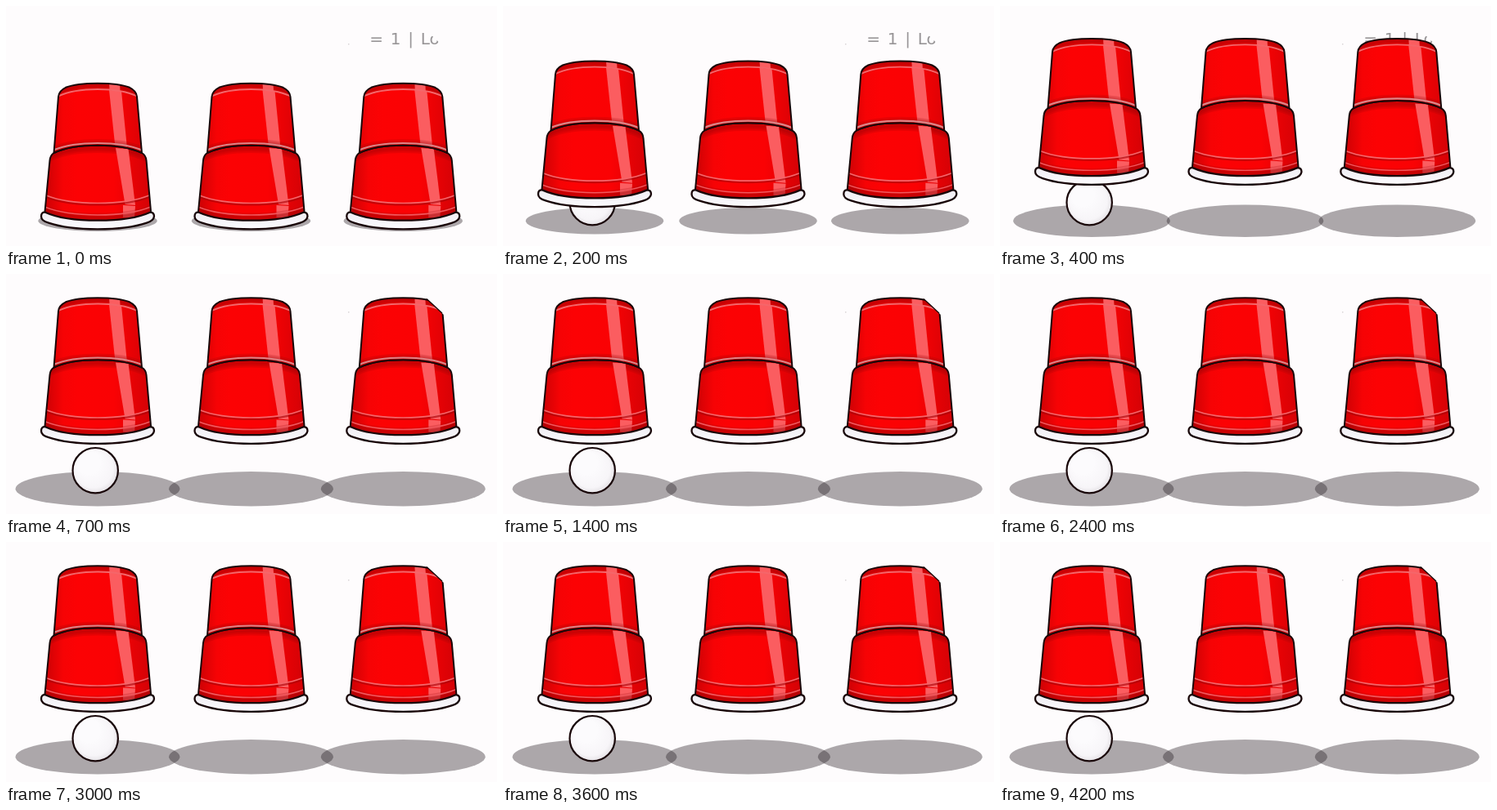
Animation of 600 by 294 pixels, one loop 4300 ms. Source, as an HTML page with a canvas:

```html
<!DOCTYPE html>
<html lang="en">
<head>
<meta charset="utf-8">
<title>Three cups</title>
<style>
html, body { margin: 0; width: 100%; height: 100%; overflow: hidden; background: #fefcfd; }
canvas { display: block; }
</style>
</head>
<body>
<canvas id="stage" width="600" height="294"></canvas>
<script>
const ctx = document.getElementById('stage').getContext('2d');
const LOOP = 4300, STEP = 100, LIFT_TIME = 480, LIFT = 65.5;
const PAPER = '#fefcfd', INK = '#190709';
const CUPS = [112, 299.5, 485.3];

// Cup outlines, relative to the cup's middle, standing on the table
const upper = new Path2D(`M-53.5 180 L-48 111 Q-47.5 104 -39 99.8
  C-22 93 22 93 39 99.8 Q47.5 104 48 111 L54 180 C28 167.5 -28 167.5 -53.5 180Z`);
const lower = new Path2D(`M-53.5 180 C-28 167.5 28 167.5 54 180 Q59 183 59.5 189
  L65.5 257 C35 269 -35 269 -65 257 L-58.5 189 Q-58 183 -53.5 180Z`);
const lip = new Path2D(`M-64 252.7 C-35 266 35 266 64 252.7 Q69 252.7 69 257.7
  Q68.5 263 60 265.7 C30 276 -30 276 -60 265.7 Q-69 263 -69 257.7 Q-69 252.2 -64 252.7Z`);

const red = ctx.createLinearGradient(-62, 0, 62, 0);
red.addColorStop(0, '#d00205');
red.addColorStop(0.16, '#f60305');
red.addColorStop(0.3, '#fc0204');
red.addColorStop(0.66, '#fa0204');
red.addColorStop(1, '#d60206');

const white = ctx.createLinearGradient(0, 253, 0, 275);
white.addColorStop(0, '#efedf3');
white.addColorStop(1, '#fdfcff');

const ballFill = ctx.createRadialGradient(101, 231, 14, 109, 240, 29);
ballFill.addColorStop(0, '#fcfbfd');
ballFill.addColorStop(0.7, '#f7f5f8');
ballFill.addColorStop(1, '#e3e0e4');

function stroke(path, color, width) {
  ctx.strokeStyle = color;
  ctx.lineWidth = width;
  ctx.stroke(path);
}

function arc(halfWidth, endY, middleY, color, width) {
  const bendY = (4 * middleY - endY) / 3;
  const path = new Path2D(`M${-halfWidth} ${endY}
    C${-halfWidth / 2} ${bendY} ${halfWidth / 2} ${bendY} ${halfWidth} ${endY}`);
  stroke(path, color, width);
}

function softArc(halfWidth, endY, middleY) {
  for (const width of [4, 8, 12]) arc(halfWidth, endY, middleY, 'rgba(150,0,8,.2)', width);
}

function shine(x1, x2, top, x3, x4, bottom) {
  ctx.fillStyle = '#fb5d60';
  ctx.fill(new Path2D(`M${x1} ${top} L${x2} ${top + 1} L${x4} ${bottom} L${x3} ${bottom - 1}Z`));
}

function section(shape, details) {
  ctx.fillStyle = red;
  ctx.fill(shape);
  ctx.save();
  ctx.clip(shape);
  details();
  ctx.restore();
  stroke(shape, INK, 2);
}

function drawCup(x, lift) {
  ctx.save();
  ctx.translate(x, -lift);
  ctx.lineJoin = ctx.lineCap = 'round';
  section(lower, () => {
    softArc(58, 184, 174);
    shine(22, 37.5, 174, 33.5, 46, 244);
    shine(31, 46, 244, 31, 45, 260);
    arc(63, 233.5, 243, 'rgba(165,0,8,.6)', 3);
    arc(63, 232, 241.5, '#f5666a', 1.7);
    softArc(65, 250, 259.5);
    arc(65, 246, 256, '#f0585d', 1.4);
  });
  section(upper, () => {
    softArc(48, 106, 97);
    shine(14, 27, 93, 14.5, 27.5, 104);
    shine(14, 29, 103, 21.5, 36, 174);
    arc(48, 110.5, 102, '#f5666a', 1.8);
    softArc(54, 178, 169);
    arc(54, 176.5, 168, '#dd8487', 2.2);
  });
  ctx.fillStyle = white;
  ctx.fill(lip);
  stroke(lip, INK, 2.3);
  ctx.restore();
}

function ellipse(x, y, rx, ry, color) {
  ctx.beginPath();
  ctx.ellipse(x, y, rx, ry, 0, 0, Math.PI * 2);
  ctx.fillStyle = color;
  ctx.fill();
}

function drawCaption() {
  ctx.font = '20px "DejaVu Sans", sans-serif';
  ctx.wordSpacing = '2.4px';
  ctx.fillStyle = '#989597';
  ctx.fillText('= 1 | Lo', 444.2, 47);
  ctx.fillStyle = '#d9d5d7';
  ctx.fillRect(418, 46, 1.5, 1.5);
}

// The slanted blank corner trims the caption and the raised right cup
function drawTrim(lift) {
  ctx.fillStyle = PAPER;
  ctx.fill(new Path2D('M512 28 L519 35 L534.5 49.5 L538 50 L538 25 L512 25Z'));
  if (lift > 60) stroke(new Path2D('M514 30.5 L519 35 L533 48'), INK, 1.3);
}

function draw(time) {
  const lift = LIFT * Math.min(1, time / LIFT_TIME);
  ctx.fillStyle = PAPER;
  ctx.fillRect(0, 0, 600, 294);
  drawCaption();
  for (const x of CUPS) {
    ellipse(x, 263.2, 72.6 + lift * 0.425, 12.7 + lift * 0.13, 'rgba(32,22,28,.37)');
  }
  ellipse(109.2, 240.7, 27.7, 27.7, ballFill);
  ctx.strokeStyle = INK;
  ctx.lineWidth = 2.2;
  ctx.stroke();
  for (const x of CUPS) drawCup(x, lift);
  drawTrim(lift);
}

const start = performance.now();
function tick() {
  const time = (performance.now() - start) % LOOP;
  draw(Math.floor(time / STEP) * STEP);
  requestAnimationFrame(tick);
}
tick();
</script>
</body>
</html>
```
